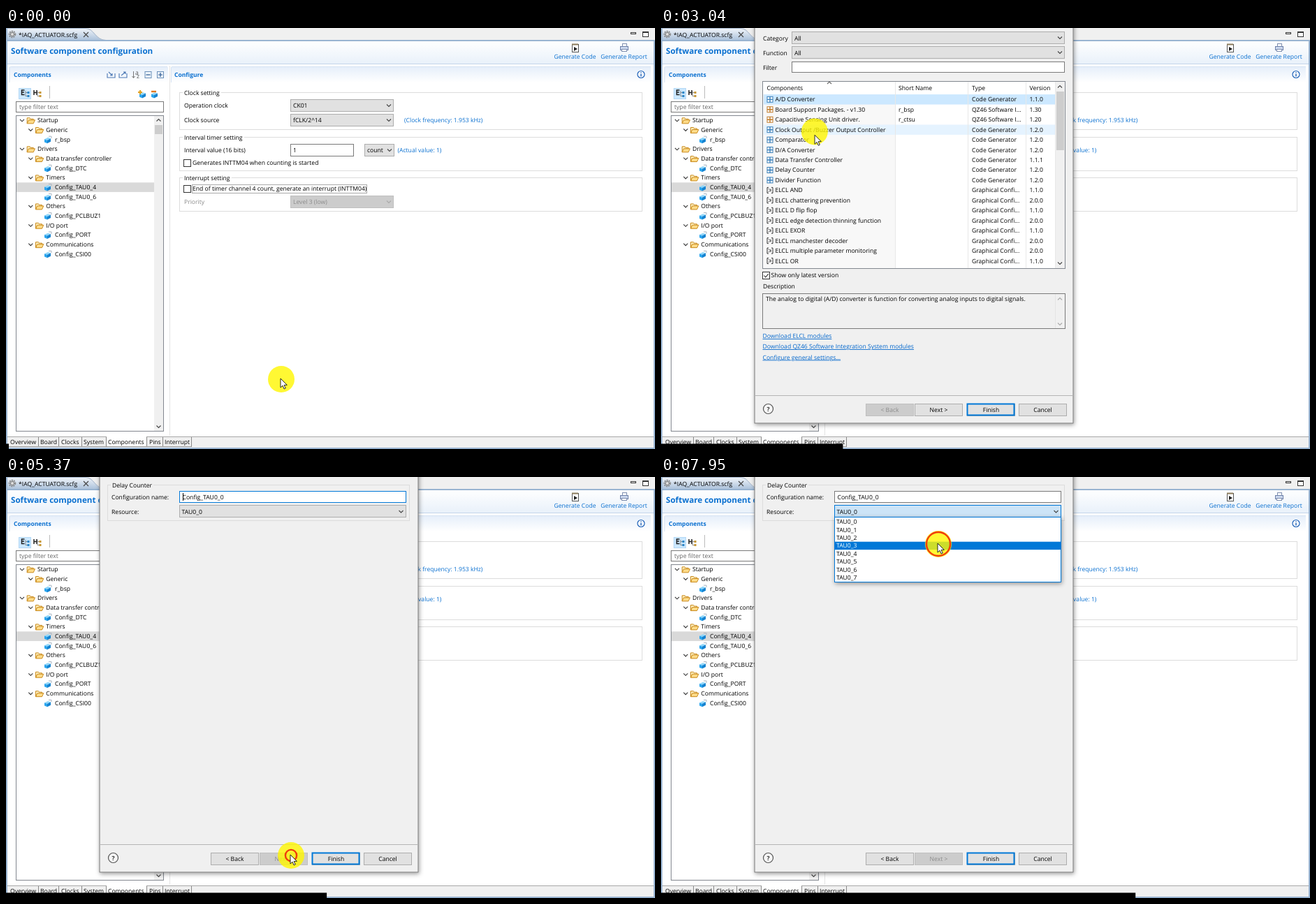
An HTML page that plays this animation: 929x603 px, repeating every 8000 ms.

```html
<!DOCTYPE html>
<html lang="en">
<head>
<meta charset="utf-8">
<title>Component wizard</title>
<style>
  html, body { margin: 0; width: 100%; height: 100%; overflow: hidden; background: #fff; }
  svg { display: block; }
  text { font: 8.6px "Open Sans", "Noto Sans", sans-serif; text-rendering: geometricPrecision; white-space: pre; }
  .b { font-weight: 700; font-size: 8.5px; }
  .h { font-weight: 700; font-size: 11.65px; }
  .m { text-anchor: middle; }
  .u { text-decoration: underline; }
</style>
</head>
<body>
<svg id="stage" width="929" height="603" viewBox="0 0 929 603"></svg>
<script>
const LOOP = 8000;
const INK = '#000', BLUE = '#0a70d0', ACCENT = '#0078d7', EDGE = '#adadad', FIELD = '#7a7a7a', GREY = '#8b8b8b';
const RIM = '#99b4d1';

// Drawing helpers: y of a text is the middle of its line.
const esc = s => s.replace(/&/g, '&amp;').replace(/</g, '&lt;');
const text = (x, y, s, fill = INK, cls = '') =>
  `<text x="${x}" y="${y + 3}" fill="${fill}" class="${cls}">${esc(s)}</text>`;
const fill = (x, y, w, h, color, more = '') =>
  `<rect x="${x}" y="${y}" width="${w}" height="${h}" fill="${color}" ${more}/>`;
const box = (x, y, w, h, color, stroke, more = '') =>
  fill(x + .5, y + .5, w - 1, h - 1, color, `stroke="${stroke}" ${more}`);
const line = (d, stroke, width = 1, more = '') =>
  `<path d="${d}" fill="none" stroke="${stroke}" stroke-width="${width}" ${more}/>`;
const at = (x, y, content) => `<g transform="translate(${x} ${y})">${content}</g>`;
const group = (id, content) => `<g id="${id}">${content}</g>`;
const chevron = (x, y, color = '#444', up = 1) =>
  line(`M${x - 3} ${y - 1.5 * up}l3 ${3 * up}l3 ${-3 * up}`, color, 1.1);
const combo = (x, y, w, s, off) =>
  box(x, y, w, 18, off ? '#ccc' : '#e1e1e1', off ? '#bfbfbf' : EDGE) +
  text(x + 4, y + 9, s, off ? GREY : INK) + chevron(x + w - 7, y + 9, off ? '#aaa' : '#444');
const button = (x, s, off) =>
  box(x, 538, 69, 18, off ? '#ccc' : '#e1e1e1', off ? '#bfbfbf' : EDGE) +
  text(x + 34.5, 547, s, off ? GREY : INK, 'm');
const frame = (x, y, w, h, title, gap, bg) =>
  box(x, y, w, h, 'none', '#dcdcdc') + fill(x + 5, y - 1, gap, 3, bg) + text(x + 7, y + .5, title);
const checkbox = (x, y, on) =>
  box(x, y, 11, 11, '#fff', '#333') + (on ? line(`M${x + 2.5} ${y + 5.5}l2.3 2.5l4-5`, '#222', 1.1) : '');

const folder = (x, y) => at(x, y,
  '<path d="M-5.500 4.500V-3.500h4l1 1.500h4v2" fill="#fff0c0" stroke="#c98a1c"/><path d="M-5.500 4.500l2.300-5h9l-2.300 5z" fill="#ffdc8a" stroke="#c98a1c"/>');
const cube = (x, y) => at(x, y,
  '<path d="M-5-.500L0-2.800L4-1.500L-1 1z" fill="#8fd6fa"/><path d="M-5-.500L-1 1V5.500L-5 3.800z" fill="#2aa5ee"/><path d="M-1 1L4-1.500V3L-1 5.500z" fill="#1683d0"/>');
const partIcon = (x, y) => cube(x, y) + line(`M${x + 1} ${y - 4.5}h4v3`, '#a8b4c0');
const gridIcon = (x, y, color) => at(x, y,
  fill(-4, -4, 8, 8, '#fff', `stroke="${color}"`) + line('M-4 0h8M0-4v8', color, 1.4));
const chipIcon = (x, y) => at(x, y,
  line('M-2-4h-2v8h2M2-4h2v8h-2', '#333') + line('M-2.500-2l4 1.600M-2.500 2l4-1.600M1-2v4', '#555', .9));
const plusMinus = (x, plus) =>
  box(x - 5, 62, 10, 10, '#eef5fc', '#6b8fb8') + line(`M${x - 3} 67h6` + (plus ? `M${x} 64v6` : ''), '#28578f', 1.2);
const treeMode = (x, letter, color) =>
  line(letter, '#222', 1.5) + line(`M${x} 90v7.500h3M${x} 92.500h3`, '#777', .8) +
  fill(x + 2.5, 91, 3, 3, color) + fill(x + 2.5, 96, 3, 3, color);

const TREE = ['0Startup', '1Generic', '2r_bsp', '0Drivers', '1Data transfer controller', '2Config_DTC',
  '1Timers', '2Config_TAU0_4', '2Config_TAU0_6', '1Others', '2Config_PCLBUZ1', '1I/O port',
  '2Config_PORT', '1Communications', '2Config_CSI00'];
const tree = TREE.map((item, i) => {
  const depth = +item[0], y = 132.3 + 13.68 * i, x = 23 + 12.3 * depth;
  return depth === 2 ? partIcon(60, y) + text(70, y, item.slice(1))
    : chevron(x, y, '#333') + folder(x + 12.7, y) + text(x + 22, y, item.slice(1));
}).join('');

const TABS = [['Overview', 6, 46], ['Board', 49, 75], ['Clocks', 79, 108], ['System', 111, 143],
  ['Components', 146, 201], ['Pins', 205, 224], ['Interrupt', 227, 265]];
const bottomTabs = fill(0, 585, 929, 18, '#f0f0f0') + line('M0 585.5H929', '#a8a8a8') +
  fill(144, 585, 57, 15, '#fff') +
  TABS.map(([s, x, end]) => text(x, 593, s) + line(`M${end + .5} 586v14`, '#888')).join('') +
  line('M0 599.5H265', '#999') + line('M143.5 586v14', '#888');

const defs = `<defs>
  <linearGradient id="tab" x2="0" y2="1"><stop stop-color="#f4f7fb"/><stop offset="1" stop-color="#a9c0da"/></linearGradient>
  <linearGradient id="head" x2="0" y2="1"><stop stop-color="#fff"/><stop offset="1" stop-color="#e9f1fa"/></linearGradient>
  <linearGradient id="section" x2="0" y2="1"><stop stop-color="#e6effa"/><stop offset="1" stop-color="#fff"/></linearGradient>
  <filter id="shadow" x="-10%" y="-10%" width="120%" height="120%"><feDropShadow dx="1" dy="2" stdDeviation="3" flood-opacity=".4"/></filter>
  <clipPath id="above"><rect width="929" height="58"/></clipPath></defs>`;

const editor = fill(0, 0, 929, 603, '#fff') + fill(0, 0, 929, 18, '#f0f0f0') +
  '<path d="M0 0H114C126 0 128 18 143 18H0z" fill="url(#tab)"/>' +
  line('M0 .5H114C126 .5 128 17.5 143 17.5', '#9fb0c6') +
  '<circle cx="9" cy="9" r="4.300" fill="none" stroke="#888" stroke-width="2" stroke-dasharray="2 1.100"/><circle cx="9" cy="9" r="2.600" fill="#ddd" stroke="#777"/>' +
  text(18, 9.5, '*IAQ_ACTUATOR.scfg') + line('M111 6l7 7M118 6l-7 7', '#444', 1.1) +
  box(894, 6, 8, 3, '#fff', '#333') + box(911, 5, 9, 8, '#fff', '#333') + line('M911 6.5h9', '#333') +
  fill(1, 18, 926, 33, 'url(#head)') + line('M1 51.5H927', '#c4d5ea') +
  text(7, 33.5, 'Software component configuration', BLUE, 'h') +
  box(810, 23, 10, 12, '#fff', '#555') + line('M810 23.5h9', '#8a7a5a', 2) + '<path d="M813 27l5 3-5 3z" fill="#222"/>' +
  text(814.5, 41, 'Generate Code', BLUE, 'm') +
  box(882, 22, 7, 5, '#fff', '#7f8fb0') + box(879, 26, 12, 6, '#ccd8ee', '#6c7fa8') + box(881, 30, 8, 4, '#fff', '#7f8fb0') +
  text(884.5, 41, 'Generate Report', BLUE, 'm') +
  fill(5, 56, 227, 22, 'url(#section)') + fill(236, 56, 687, 22, 'url(#section)') +
  line('M5 78V57q0-1.500 1.500-1.500H231M236.500 78V57q0-1.500 1.500-1.500H923', '#d5e2f2') +
  line('M234.500 54V584', '#e3e3e3') +
  text(11, 66.5, 'Components', BLUE, 'b') + text(241, 66.5, 'Configure', BLUE, 'b') +
  line('M145 65v6h11v-6M147 63l5 5M152 65v3h-3', '#4c78b4', 1.1) +
  line('M162 65v6h11v-6M165 68l6-5M168 63h3v3', '#4c78b4', 1.1) +
  line('M182.500 62v9M180.500 69l2 2.500l2-2.500', '#777') + text(185, 64, 'a', '#555') + text(187, 69, 'z', '#555') +
  plusMinus(203.5) + plusMinus(221, true) +
  '<circle cx="909" cy="66.500" r="5" fill="#fff" stroke="#1e62b8" stroke-width="1.200"/>' + line('M909 65.500v4M909 63v1.300', '#1e62b8', 1.4) +
  box(18, 86, 18, 16, '#cce8ff', '#b4d8f5') +
  treeMode(28, 'M26.500 89h-4v6.500h4M22.500 92h3.500', '#2b86c8') + treeMode(45, 'M40 89v7M40 92.500h4M44 89v7', '#c79736') +
  line('M62.500 83v18', '#bbb') +
  cube(196, 95) + line('M189 92h6M192 89v6', '#e0a020', 2) + cube(213, 95) + line('M208 91h7', '#e07820', 2.4) +
  box(14, 105, 212, 16, '#fff', FIELD) + text(19, 113, 'type filter text', '#666') +
  box(14, 125, 212, 453, '#fff', '#82878f') + fill(212, 126, 13, 451, '#f0f0f0') + fill(213, 139, 11, 13, '#cdcdcd') +
  chevron(218.5, 132, '#444', -1) + chevron(218.5, 571) +
  fill(15, 221.3, 197, 13.6, '#d9d9d9') + tree +
  frame(248, 92, 663, 54, 'Clock setting', 55, '#fff') +
  text(255, 111, 'Operation clock') + combo(407, 102, 148, 'CK01') +
  text(255, 132, 'Clock source') + combo(407, 123, 148, 'fCLK/2^14') + text(570, 132, '(Clock frequency: 1.953 kHz)', BLUE) +
  frame(248, 156, 663, 49, 'Interval timer setting', 88, '#fff') +
  text(255, 174.5, 'Interval value (16 bits)') + box(407, 166, 91, 18, '#fff', FIELD) + text(411, 174.5, '1') +
  combo(513, 166, 43, 'count') + text(560.5, 174.5, '(Actual value: 1)', BLUE) +
  checkbox(254, 188) + text(267, 193, 'Generates INTTM04 when counting is started') +
  frame(248, 214, 663, 49, 'Interrupt setting', 70, '#fff') +
  checkbox(254, 225) + text(267, 230, 'End of timer channel 4 count, generate an interrupt (INTTM04)') +
  box(266, 224, 251, 13, 'none', '#555', 'stroke-dasharray="1 1"') +
  text(255, 249, 'Priority', GREY) + combo(407, 240, 148, 'Level 3 (low)', true) +
  bottomTabs + line('M1 0V602H928V18H0', RIM, 2);

const TYPES = { g: 'Code Generator', s: 'QZ46 Software I...', c: 'Graphical Confi...' };
const ROWS = `g|A/D Converter||1.1.0
s|Board Support Packages. - v1.30|r_bsp|1.30
s|Capacitive Sensing Unit driver.|r_ctsu|1.20
g|Clock Output /Buzzer Output Controller||1.2.0
g|Comparator||1.2.0
g|D/A Converter||1.2.0
g|Data Transfer Controller||1.1.1
g|Delay Counter||1.2.0
g|Divider Function||1.2.0
c|ELCL AND||1.1.0
c|ELCL chattering prevention||2.0.0
c|ELCL D flip flop||1.1.0
c|ELCL edge detection thinning function||2.0.0
c|ELCL EXOR||1.1.0
c|ELCL manchester decoder||2.0.0
c|ELCL multiple parameter monitoring||2.0.0
c|ELCL OR||1.1.0`.split('\n').map(r => r.split('|'));
const ROW_TOP = 95.1, ROW_STEP = 14.45;
const rows = ROWS.map(([kind, name, short, version], i) => {
  const y = ROW_TOP + ROW_STEP * (i + .5);
  return (kind === 'c' ? chipIcon(156, y) : gridIcon(156, y, kind === 'g' ? '#3a7fb8' : '#c07a28')) +
    text(163.5, y, name) + text(340, y, short) + text(445, y, TYPES[kind]) + text(527.5, y, version);
}).join('');

const listPage = text(146, 14.5, 'Category') + combo(187, 5, 391, '') + text(191, 14.5, 'All') +
  text(146, 36, 'Function') + combo(187, 26, 391, '') + text(191, 35.5, 'All') +
  text(146, 56.5, 'Filter') + box(187, 48, 391, 16, '#fff', FIELD) +
  box(145, 76, 434, 269, '#fff', '#82878f') + fill(146, 95, 189, 249, '#f8f8f8') +
  fill(147, 0, 417, ROW_STEP, '#e5f3ff', 'id="hover"') + fill(147, 0, 417, ROW_STEP, '#cce8ff', 'id="selected"') +
  line('M335.500 77V344M439.500 77V344M522.500 77V344M564.500 77V344', '#e8e8e8') +
  text(151.5, 86, 'Components') + text(340, 86, 'Short Name') + text(445, 86, 'Type') + text(527.5, 86, 'Version') +
  chevron(241, 78.5, '#666', -1) + rows +
  fill(565, 77, 13, 267, '#f0f0f0') + fill(566, 91, 11, 84, '#cdcdcd') + chevron(571, 84, '#444', -1) + chevron(571, 337) +
  checkbox(145, 349, true) + text(157.5, 354, 'Show only latest version') + text(146, 370, 'Description') +
  box(145, 380, 434, 51, '#f0f0f0', FIELD) + line('M564.500 381v49', '#e4e4e4') +
  chevron(571, 388, '#aaa', -1) + chevron(571, 424, '#aaa') +
  group('analog', text(150, 388, 'The analog to digital (A/D) converter is function for converting analog inputs to digital signals.')) +
  group('delay', text(150, 388, 'The delay count function is a timer that starts counting at the valid edge of the input signal and') +
    text(150, 399.3, 'generates an interrupt after an arbitrary delay period.')) +
  text(145.5, 441, 'Download ELCL modules', '#0066cc', 'u') +
  text(145.5, 456, 'Download QZ46 Software Integration System modules', '#0066cc', 'u') +
  text(145.5, 471.5, 'Configure general settings...', '#0066cc', 'u') +
  button(293, '< Back', true) + button(363, 'Next >') +
  group('nextHot', box(363, 538, 69, 18, '#e5f1fb', ACCENT) + text(397.5, 547, 'Next >', INK, 'm'));

const configPage = frame(145, 11, 433, 52, 'Delay Counter', 61, '#f0f0f0') +
  text(151, 29, 'Configuration name:') + box(248, 20, 325, 17, '#fff', FIELD, 'id="nameField"') +
  text(252.5, 29, 'Config_TAU0_0') + line('M253.500 23v11', '#000', 1, 'id="caret"') +
  text(151, 49.5, 'Resource:') + box(248, 40, 325, 18, '#e1e1e1', EDGE, 'id="resource"') +
  text(251.5, 49.5, 'TAU0_0') + chevron(565.5, 49.5) +
  button(293, '< Back') + button(363, 'Next >', true);

const dialog = fill(134, -30, 456, 596, '#f0f0f0', 'stroke="#777" filter="url(#shadow)"') +
  group('listPage', listPage) + group('configPage', configPage) +
  line('M134 526.500H590', '#b4b4b4') +
  '<circle cx="153.500" cy="545.500" r="7" fill="#f6f6f6" stroke="#555" stroke-width="1.200"/>' + text(153.5, 545.5, '?', '#333', 'b m') +
  button(438, 'Finish') + box(438, 538, 68, 17, 'none', ACCENT, 'stroke-width="2"') + button(512, 'Cancel');

const MENU_TOP = 58.4, MENU_STEP = 11.43;
const menu = box(248, 57, 325, 94, '#fff', ACCENT, 'filter="url(#shadow)"') +
  fill(249, 0, 323, MENU_STEP, ACCENT, 'id="menuMark"') +
  Array.from({ length: 8 }, (_, i) => `<g class="option">${text(251, MENU_TOP + MENU_STEP * (i + .5), 'TAU0_' + i)}</g>`).join('');

const pointer =
  group('arrow', '<path d="M0 0V13L3 10.200 5.200 15 7.200 14 5.100 9.400H9.300Z" fill="#fff" stroke="#111" stroke-width=".9"/>') +
  group('hand', '<path d="M-1.500 9V.5q1.500-2 3 0V6l1-1 1.500 1 1-.5 1.500 1 1-.2 1 1.200V12l-1.500 4H0L-4 10.500q0-2 2.500-.5z" fill="#fff" stroke="#111" stroke-width=".9"/>');

document.getElementById('stage').innerHTML = defs + editor + group('dialog', dialog) + group('menu', menu) +
  group('spot', '<circle id="glow" r="19" fill="#fff700" fill-opacity=".8"/><circle id="ring" fill="none" stroke="#f03c0c" stroke-width="2.400"/>') +
  group('pointer', pointer) + fill(0, 595.5, 4, 8, '#000', 'id="progress"');

const $ = id => document.getElementById(id);
const show = (id, on) => $(id).setAttribute('display', on ? 'inline' : 'none');
const set = (id, attrs) => { for (const k in attrs) $(id).setAttribute(k, attrs[k]); };
const inside = (p, x, y, w, h) => p[0] >= x && p[0] < x + w && p[1] >= y && p[1] < y + h;

// Pointer path: time, x, y.
const PATH = [[0, 393, 502], [40, 393, 502], [860, 260, 398], [1450, 197, 93], [2540, 199, 91], [2900, 212, 112],
  [3040, 220, 153], [3200, 230, 192], [3600, 330, 204], [4180, 366, 208], [4350, 372, 329], [4420, 374, 375],
  [5050, 407, 541], [5750, 407, 541], [6550, 398, 51], [6850, 398, 51], [7350, 396, 95], [8000, 396, 95]];
const OPEN = 2150, PICK = 3770, NEXT = 5330, DROP = 6720, MENU_BEHIND = 6900;
const CLICKS = [1800, 3740, 5290, 6690, 7780];

const slope = (i, k) => (PATH[i + 1][k] - PATH[i][k]) / (PATH[i + 1][0] - PATH[i][0]);
const tangent = (i, k) => {
  if (i === 0 || i === PATH.length - 1) return 0;
  const a = slope(i - 1, k), b = slope(i, k);
  return a * b > 0 ? 2 * a * b / (a + b) : 0;
};
// Monotone cubic through the path points.
function position(t) {
  t = Math.max(0, t);
  let i = 0;
  while (i < PATH.length - 2 && PATH[i + 1][0] <= t) i++;
  const span = PATH[i + 1][0] - PATH[i][0], u = (t - PATH[i][0]) / span, v = 1 - u;
  return [1, 2].map(k => PATH[i][k] * v * v * (1 + 2 * u) + PATH[i + 1][k] * u * u * (3 - 2 * u) +
    span * u * v * (tangent(i, k) * v - tangent(i + 1, k) * u));
}

function render(t) {
  const tip = position(t), late = position(t - 20), spot = [late[0] + 1, late[1] + 1];
  const onList = t < NEXT, dropped = t >= DROP;

  show('dialog', t >= OPEN);
  show('listPage', onList);
  show('configPage', !onList);
  show('menu', dropped);

  const row = Math.floor((spot[1] - ROW_TOP) / ROW_STEP);
  show('hover', inside(spot, 147, ROW_TOP, 417, ROW_STEP * ROWS.length));
  set('hover', { y: ROW_TOP + ROW_STEP * row });
  set('selected', { y: ROW_TOP + ROW_STEP * (t < PICK ? 0 : 7) });
  show('analog', t < PICK);
  show('delay', t >= PICK);
  show('nextHot', inside(tip, 363, 538, 69, 18));

  set('nameField', { stroke: dropped ? FIELD : ACCENT });
  show('caret', !dropped && (t - NEXT) % 1060 < 530);
  const hot = inside(tip, 248, 40, 325, 18);
  set('resource', { fill: dropped ? '#cce4f7' : hot ? '#e5f1fb' : '#e1e1e1', stroke: dropped || hot ? ACCENT : EDGE });
  const option = Math.max(0, Math.floor((tip[1] - MENU_TOP) / MENU_STEP));
  set('menuMark', { y: MENU_TOP + MENU_STEP * option });
  document.querySelectorAll('.option text').forEach((el, i) => el.setAttribute('fill', i === option ? '#fff' : INK));

  set('glow', { cx: spot[0], cy: spot[1] });
  const click = CLICKS.find(c => t >= c && t < c + 230);
  show('ring', click !== undefined);
  if (click !== undefined) set('ring', { cx: spot[0], cy: spot[1], r: Math.min(17, (t - click) * .1) });
  set('spot', { 'clip-path': dropped && t < MENU_BEHIND ? 'url(#above)' : 'none' });

  const pointing = t < OPEN && tip[1] < 101;
  show('hand', pointing);
  show('arrow', !pointing);
  set('pointer', { transform: `translate(${tip[0]} ${tip[1]})` });
  set('progress', { width: Math.max(4, 1 + t * .0853) });
}

const start = performance.now();
function tick() {
  render((performance.now() - start) % LOOP);
  requestAnimationFrame(tick);
}
render(0);
requestAnimationFrame(tick);
</script>
</body>
</html>
```
